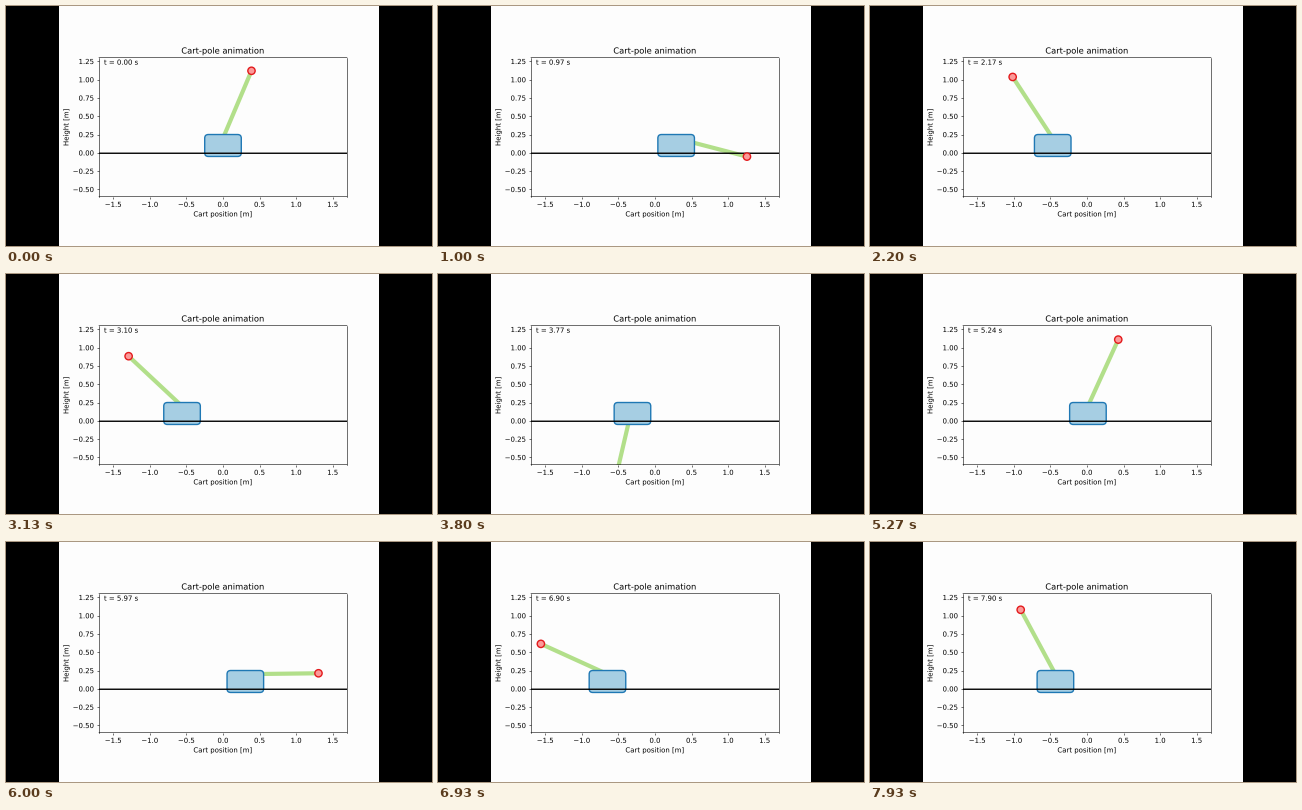
A matplotlib script that plays this animation: 426x240 px, repeating every 8 s.

```python
import numpy as np
import matplotlib.pyplot as plt
from matplotlib.animation import FuncAnimation
from matplotlib.patches import Circle, FancyBboxPatch, Rectangle
from matplotlib.patheffects import Normal
from matplotlib.text import Text

W, H, DPI = 426, 240, 50
LOOP_MS, FRAMES = 8000, 320
STEPS = 120             # poses per loop
DT = 60 / 1799          # time between simulated samples
G = 9.81
CART_MASS = POLE_MASS = LENGTH = INERTIA = 1.0
START = 0.4
PIVOT_Y = 0.2
CART_W, CART_H, CART_Y = 0.5, 0.3, -0.05

plt.rcParams.update({"font.family": "DejaVu Sans", "text.hinting": "none"})

RATIO = POLE_MASS * LENGTH / (CART_MASS + POLE_MASS)


def slope(state):
    angle, rate = state
    s, c = np.sin(angle), np.cos(angle)
    ml = POLE_MASS * LENGTH
    inertia = INERTIA + ml * LENGTH - ml * RATIO * c * c
    return np.array([rate, (ml * G * s - ml * RATIO * s * c * rate**2) / inertia])


def simulate(count, substeps=10):
    """Pole angle at each sample, by fourth-order Runge-Kutta."""
    h = DT / substeps
    state = np.array([START, 0.0])
    angles = [START]
    for _ in range(count - 1):
        for _ in range(substeps):
            k1 = slope(state)
            k2 = slope(state + h / 2 * k1)
            k3 = slope(state + h / 2 * k2)
            k4 = slope(state + h * k3)
            state = state + h / 6 * (k1 + 2 * k2 + 2 * k3 + k4)
        angles.append(state[0])
    return np.array(angles)


angles = simulate(2 * STEPS)
# no outside force: the cart follows from the momentum balance
carts = RATIO * (np.sin(angles) - np.sin(START))

fig = plt.figure(figsize=(W / DPI, H / DPI), dpi=DPI, facecolor="black")
fig.add_artist(Rectangle((53 / W, 0), 320 / W, 1, facecolor="#fdfdfd",
                         edgecolor="none", zorder=-1))

x_max, y_min, y_max = 1.695, -0.6, 1.3
ax_w = 248
ax_h = ax_w * (y_max - y_min) / (2 * x_max)
ax = fig.add_axes([93 / W, (118.8 - ax_h / 2) / H, ax_w / W, ax_h / H],
                  facecolor="#fdfdfd")
ax.set(xlim=(-x_max, x_max), ylim=(y_min, y_max),
       xticks=np.arange(-1.5, 1.6, 0.5), yticks=np.arange(-0.5, 1.3, 0.25),
       xlabel="Cart position [m]", ylabel="Height [m]",
       title="Cart-pole animation")
ax.spines[["top", "bottom"]].set_snap(False)

pole, = ax.plot([], [], color="#b2df8a", lw=6, zorder=2)
cart = FancyBboxPatch((-CART_W / 2, CART_Y), CART_W, CART_H,
                      boxstyle="round,pad=0,rounding_size=0.05",
                      facecolor="#a6cee3", edgecolor="#1f78b4", lw=2, zorder=3)
tip = Circle((0, 0), 0.05, facecolor="#fb9a99", edgecolor="#e31a1c",
             lw=2, zorder=5)
ax.add_patch(cart)
ax.add_patch(tip)
ax.axhline(-0.006, color="black", lw=2, zorder=4, snap=False)
clock = ax.text(0.02, 0.95, "", transform=ax.transAxes, zorder=6)

# text drawn as outlines keeps its sub-pixel position
for text in fig.findobj(Text):
    text.set_path_effects([Normal()])


def update(frame):
    step = (3 * frame + 2) // 8
    i = max(0, 2 * step - 1)
    x, angle = carts[i], angles[i]
    end = x + LENGTH * np.sin(angle), PIVOT_Y + LENGTH * np.cos(angle)
    cart.set_x(x - CART_W / 2)
    pole.set_data([x, end[0]], [PIVOT_Y, end[1]])
    tip.center = end
    clock.set_text(f"t = {i * DT:.2f} s")
    return pole, cart, tip, clock


anim = FuncAnimation(fig, update, frames=FRAMES, interval=LOOP_MS / FRAMES,
                     repeat=True, repeat_delay=0, blit=False)
plt.show()
```
